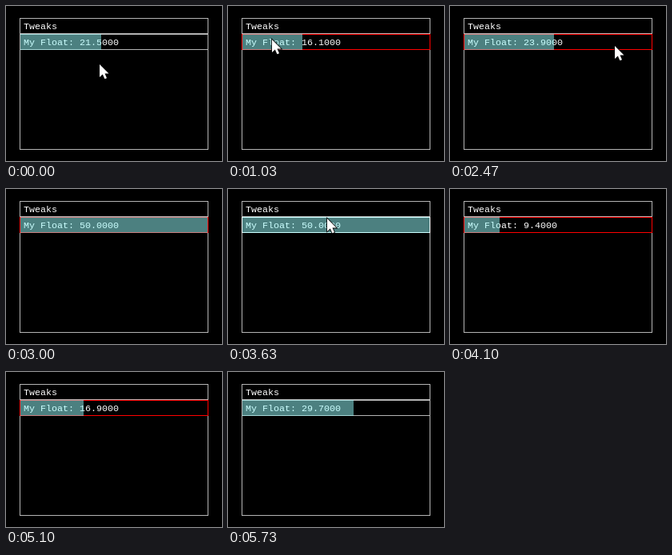
Animation, 270 px wide and 194 px high, one loop 6030 ms. Source, as an HTML page:

```html
<!DOCTYPE html>
<html>
<head>
<meta charset="utf-8">
<style>
  html, body { margin: 0; width: 100%; height: 100%; overflow: hidden; background: #000; }
  svg { display: block; width: 270px; height: 194px; }
  rect { shape-rendering: crispEdges; fill: none; }
  text { font: 11.667px "Liberation Mono", "DejaVu Sans Mono", monospace; fill: #fff; white-space: pre; }
  .line { stroke: #b4b4b4; }
</style>
</head>
<body>
<svg viewBox="0 0 270 194">
  <rect class="line" x="17.5" y="15.5" width="235" height="164"/>
  <rect class="line" x="17.5" y="15.5" width="235" height="19"/>
  <rect id="row" x="17.5" y="35.5" width="235" height="19"/>
  <text x="22" y="29">Tweaks</text>
  <text id="label" x="22" y="49"></text>
  <rect id="bar" x="18" y="35" height="20" style="fill: #98ffff; opacity: .5"/>
  <path id="pointer" d="M0 0V16L3.8 12.6 6.4 18.3 9 17.2 6.5 11.6H11.5Z"
        fill="#fff" stroke="#000" stroke-width="1.6" paint-order="stroke"/>
</svg>
<script>
const LOOP = 6030, MAX = 50, STEP = 0.1;

// Pointer path: time, x, y
const path = [
  [0, 117, 73], [30, 117, 73], [200, 109, 47], [400, 109, 47],
  [700, 86, 50], [1030, 55, 42], [1130, 55, 42],
  [1300, 19, 44], [1325, -16, 44], [1450, -16, 44], [1475, 18, 45],
  [1640, 57, 47], [1870, 57, 47],
  [2470, 206, 50], [2500, 206, 50], [2680, 262, 98], [2900, 470, 99],
  [3150, 470, 92], [3200, 240, 90], [3470, 125, 38], [3630, 124, 37], [3670, 124, 37],
  [3780, 30, 45], [4200, -378, 46], [4270, -378, 46], [4400, 7, 45],
  [4570, 178, 43], [4600, 178, 43], [4840, 182, 43], [4970, 182, 43],
  [5200, 479, 44], [5370, 479, 44], [5480, 479, 230], [5550, 200, 200],
  [5570, 188, 176], [5640, 150, 158], [5700, 112, 178], [5730, 105, 200], [LOOP, 105, 200]
];

// Button held: press time, release time, value when pressed
const drags = [[400, 1400, 21.5], [1870, 3050, 9], [3670, 4240, 50], [4840, 5370, 0]];

const $ = id => document.getElementById(id);
const row = $("row"), label = $("label"), bar = $("bar"), pointer = $("pointer");

function pointerAt(t) {
  const i = path.findIndex(p => p[0] > t);
  const [t0, x0, y0] = path[i - 1], [t1, x1, y1] = path[i];
  const k = (t - t0) / (t1 - t0);
  return [Math.round(x0 + (x1 - x0) * k), Math.round(y0 + (y1 - y0) * k)];
}

function valueAt(t) {
  const drag = drags.filter(d => d[0] <= t).pop();
  if (!drag) return drags[0][2];
  const [down, up, start] = drag;
  const moved = pointerAt(Math.min(t, up))[0] - pointerAt(down)[0];
  return Math.min(MAX, Math.max(0, start + moved * STEP));
}

function draw(now) {
  const t = now % LOOP;
  const [x, y] = pointerAt(t), value = valueAt(t);
  const held = drags.some(([down, up]) => t >= down && t < up);
  const over = x >= 17 && x <= 252 && y >= 35 && y < 55;
  row.setAttribute("stroke", held ? "#f00" : over ? "#fff" : "#b4b4b4");
  label.textContent = "My Float: " + value.toFixed(4);
  bar.setAttribute("width", Math.round(value / MAX * 234));
  pointer.setAttribute("transform", `translate(${x} ${y})`);
}

const begin = performance.now();
function tick() {
  draw(performance.now() - begin);
  requestAnimationFrame(tick);
}
tick();
</script>
</body>
</html>
```
